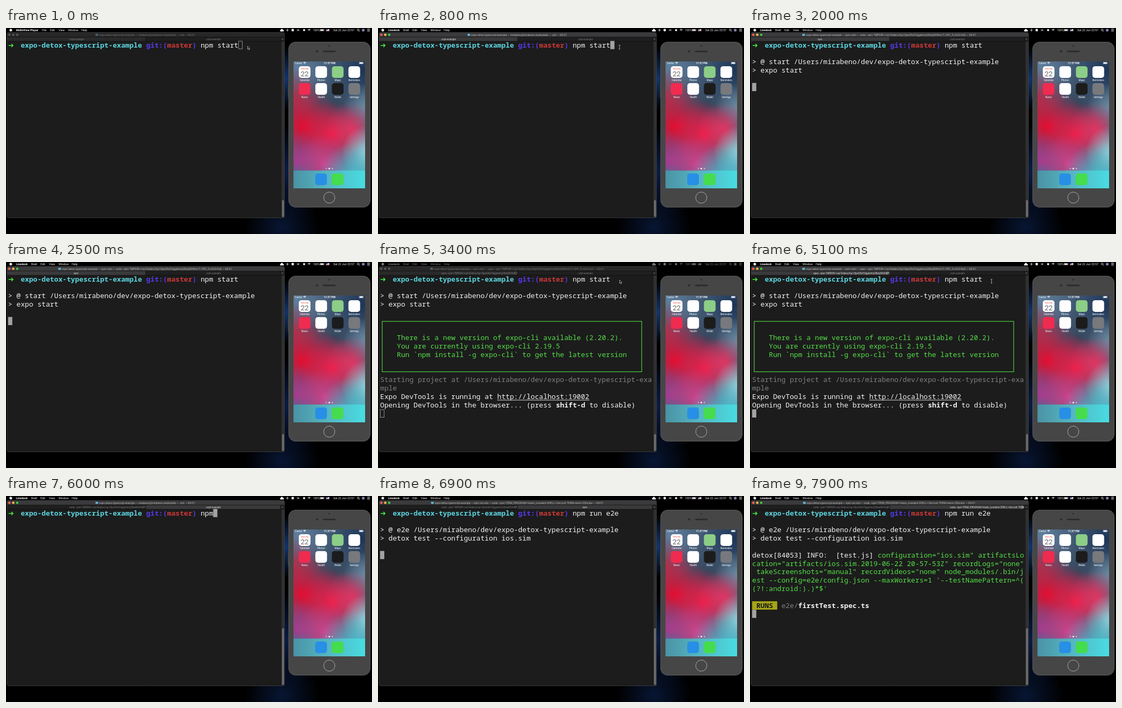
Animation of 690 by 388 pixels, one loop 8 s. Source, as an HTML page with a canvas:

```html
<!DOCTYPE html>
<html lang="en">
<head>
<meta charset="utf-8">
<style>
html, body { margin: 0; width: 100%; height: 100%; overflow: hidden; background: #000; }
canvas { display: block; }
</style>
</head>
<body>
<canvas id="stage" width="690" height="388"></canvas>
<script>
const g = document.getElementById('stage').getContext('2d');
const LOOP = 8000, PITCH = 7.89, ROW = 15.82, LEFT = 4;
const MONO = '"Noto Sans Mono", "DejaVu Sans", monospace';
const UI = 'Roboto, Inter, sans-serif';
const GREEN = '#55df48', WHITE = '#f4f4f4';
const USER = 'mirabeno', PROJECT = 'expo-detox-typescript-example';
const TMP = 'npm TMPDIR=/var/folders/hp/c5pnl2hd10gglxttmj30bty800hr6/T/';
const TERM = 'npm TERM_PROGRAM=Vasko_Linedeck SHELL=/bin/zsh TERM=xterm-256color';

// Key moments in ms
const T = { focus: 500, enter: 1400, notice: 2700, project: 3000, away: 3200, back: 4300,
            tab: 5500, type: 5800, run: 6600, log: 7400, spec: 7700 };

function rect(x, y, w, h, fill, r = 0) {
  g.fillStyle = fill;
  g.beginPath();
  g.roundRect(x, y, w, h, r);
  g.fill();
}

function dot(x, y, r, fill) {
  g.fillStyle = fill;
  g.beginPath();
  g.arc(x, y, r, 0, 7);
  g.fill();
}

function ring(x, y, r, color, width = 0.8, from = 0, to = 7) {
  g.strokeStyle = color;
  g.lineWidth = width;
  g.beginPath();
  g.arc(x, y, r, from, to);
  g.stroke();
}

function line(color, width, ...points) {
  g.strokeStyle = color;
  g.lineWidth = width;
  g.beginPath();
  for (let i = 0; i < points.length; i += 2) g.lineTo(points[i], points[i + 1]);
  g.stroke();
}

function label(text, x, y, size, color, align = 'left', weight = 400) {
  g.font = `${weight} ${size}px ${UI}`;
  g.textAlign = align;
  g.fillStyle = color;
  g.fillText(text, x, y);
  return g.measureText(text).width;
}

function glow(x, y, r, color) {
  const grad = g.createRadialGradient(x, y, 0, x, y, r);
  grad.addColorStop(0, color);
  grad.addColorStop(1, color.slice(0, 7) + '00');
  g.fillStyle = grad;
  g.fillRect(x - r, y - r, 2 * r, 2 * r);
}

// Console text; several [text, color, weight] runs share one row
const colX = col => LEFT + col * PITCH;
const rowY = row => 32 + row * ROW;

function print(row, col, ...runs) {
  g.textAlign = 'left';
  for (const [text, color = WHITE, weight = 400] of runs) {
    g.font = `${weight} 13.15px ${MONO}`;
    g.fillStyle = color;
    g.fillText(text, colX(col), rowY(row) + 4.6);
    col += text.length;
  }
}

function cursor(row, col, active) {
  const x = colX(col), y = rowY(row) - 7.6;
  if (active) rect(x, y, PITCH, 15.4, '#a2a2a2');
  else {
    g.strokeStyle = '#9a9a9a';
    g.lineWidth = 0.9;
    g.strokeRect(x + 0.4, y + 0.5, PITCH - 0.8, 14.4);
  }
}

function wifi(x, y, color) {
  for (const r of [1.2, 2.5, 3.8]) ring(x, y, r, color, 0.8, -2.36, -0.78);
}

function battery(x, y, w, color) {
  g.strokeStyle = color;
  g.lineWidth = 0.5;
  g.strokeRect(x, y, w, 3.6);
  rect(x + 0.7, y + 0.7, w - 1.4, 2.2, color);
  rect(x + w + 0.4, y + 1.1, 0.7, 1.4, color);
}

function menuBar(media, away) {
  const c = away ? '#777' : '#f2f2f2';
  rect(0, 0, 690, 8, '#000');
  dot(9, 4, 2.5, c);
  label(media ? 'MelloView Player' : 'Linedeck', 19, 5.9, 5.4, c, 'left', 700);
  const items = media
    ? { File: 68, Edit: 83, View: 99, Window: 117, Help: 142 }
    : { Shell: 47, Edit: 65, View: 81, Window: 99, Help: 124 };
  for (const name in items) label(name, items[name], 5.9, 5.4, c);

  rect(516.5, 3.5, 7.5, 3, c, 1.5);
  dot(520, 3.4, 2, c);
  line(c, 0.8, 528, 4, 533, 4);
  line(c, 0.8, 530.5, 1.5, 530.5, 6.5);
  dot(540.5, 4, 2.4, c);
  line(c, 0.8, 548.5, 2.5, 553, 5.5);
  line(c, 0.8, 548.5, 5.5, 553, 2.5);
  dot(562, 4, 2, c);
  wifi(571.5, 6, c);
  label('100%', 579, 5.9, 5, c);
  battery(592, 2.2, 7, c);
  rect(603.5, 2, 6, 4, away ? '#555' : '#d9d9e2');
  rect(603.5, 2, 3, 2, away ? '#333' : '#3b4a9c');
  line(away ? '#666' : '#c33b48', 0.7, 603.5, 5, 609.5, 5);
  label('Sat 22 Jun 23:57', 617, 5.9, 5.3, c);
  ring(664, 3.6, 1.7, c);
  line(c, 0.8, 665.2, 4.9, 667, 6.7);
  dot(673.5, 4, 2.6, away ? '#555' : '#8a7fb5');
  for (const y of [2, 4, 6]) line(c, 0.8, 681, y, 686, y);
}

function windowState(t) {
  if (t < T.enter) return [`${USER}@${USER}-studiodesk — -zsh`, '..cript-example', '..cript-example'];
  if (t < T.project) return [`npm start — node ‹ ${TMP} XPC_FLAGS=0x0`, 'npm', '..cript-example'];
  if (t < T.tab) return [`npm start — open ‹ ${TMP} XPC_FLAGS=0x0`, `open ‹ ${TMP}…`, '..cript-example'];
  const first = `node ‹ ${TMP}…`;
  if (t < T.run) return [`${USER}@${USER}-studiodesk — -zsh`, first, '..cript-example'];
  return [`npm run e2e — node ‹ ${TERM}`, first, t < T.log ? 'npm' : `node ‹ ${TERM.slice(0, 52)}…`];
}

function windowChrome(t, active) {
  const second = t >= T.tab;
  const [detail, ...tabs] = windowState(t);
  rect(2, 8.5, 523, 349, '#1c1c1c', 3);
  rect(2, 8.5, 523, 8.5, active ? '#3a3a3c' : '#272728', [3, 3, 0, 0]);
  const lights = active ? ['#fb5f57', '#fdbc40', '#34c84a'] : ['#555', '#555', '#555'];
  lights.forEach((c, i) => dot(6.3 + i * 7.4, 12.7, 2.3, c));

  const width = label(`${PROJECT} — ${detail} — 65×21`, 266, 14.6, 4.95, active ? '#b8b8b8' : '#727272', 'center');
  rect(266 - width / 2 - 7, 11, 5, 3.8, active ? '#62b5da' : '#4a6470', 0.6);

  rect(2, 17, 523, 8, '#202021');
  tabs.forEach((name, i) => {
    const on = (i === 1) === second;
    const x = i ? 263.5 : 2, w = i ? 253.5 : 261;
    rect(x, 17, w, 8, on ? (active ? '#3a3a3c' : '#2a2a2b') : '#1f1f20');
    const color = on && active ? '#dedede' : '#777';
    g.save();
    g.beginPath();
    g.rect(x, 17, w, 8);
    g.clip();
    const long = name.length > 20;
    label(name, i ? (long ? 450 : 390) : (long ? 194 : 132), 22.7, 4.5, color, 'center');
    g.restore();
    if (long) ring(i ? 512.5 : 259, 21, 2, color, 0.7, t / 130, t / 130 + 4.8);
  });
  line('#0d0d0d', 0.7, 2, 17, 525, 17);
  line('#0d0d0d', 0.7, 2, 25, 525, 25);
  line('#111', 0.7, 263.3, 17, 263.3, 25);
  line('#111', 0.7, 517.3, 17, 517.3, 25);
  line('#888', 0.6, 519.5, 21, 522.5, 21);
  line('#888', 0.6, 521, 19.5, 521, 22.5);

  rect(519.5, 25.4, 5.5, 331, '#303031');
  const top = second ? 249 : 324;
  rect(520.2, top, 4, 356 - top, '#6b6b6b', 2);
  g.strokeStyle = '#505052';
  g.lineWidth = 0.6;
  g.beginPath();
  g.roundRect(2, 8.5, 523, 349, 3);
  g.stroke();
}

function prompt(command) {
  print(0, 0, ['➜  ', '#43e83a', 700], [PROJECT, '#5bd5df', 700], [' '],
    ['git:(', '#5838ef', 700], ['master', '#cd3838', 700], [') ', '#5838ef', 700], [command, WHITE, 500]);
}

function startTab(t, active) {
  prompt('npm start');
  if (t < T.enter) return cursor(0, 55, active);
  print(2, 0, [`> @ start /Users/${USER}/dev/${PROJECT}`]);
  print(3, 0, ['> expo start']);
  if (t < T.notice) return cursor(5, 0, active);

  g.strokeStyle = GREEN;
  g.lineWidth = 1.1;
  g.strokeRect(colX(0.5), rowY(5) + 0.7, 62 * PITCH, 6 * ROW);
  ['There is a new version of expo-cli available (2.20.2).',
   'You are currently using expo-cli 2.19.5',
   'Run `npm install -g expo-cli` to get the latest version'
  ].forEach((text, i) => print(7 + i, 4, [text, GREEN]));
  if (t < T.project) return cursor(12, 0, active);

  const path = `Starting project at /Users/${USER}/dev/${PROJECT}`;
  print(12, 0, [path.slice(0, 65), '#808080']);
  print(13, 0, [path.slice(65), '#808080']);
  print(14, 0, ['Expo DevTools is running at http://localhost:19002']);
  line(WHITE, 0.9, colX(28), rowY(14) + 6.6, colX(50), rowY(14) + 6.6);
  print(15, 0, ['Opening DevTools in the browser... (press '], ['shift-d', WHITE, 700], [' to disable)']);
  cursor(16, 0, active);
}

function testTab(t) {
  const command = 'npm run e2e';
  const typed = Math.max(0, Math.min(command.length, Math.floor((t - T.type) / 60)));
  prompt(command.slice(0, typed));
  if (t < T.run) return cursor(0, 46 + typed, true);
  print(2, 0, [`> @ e2e /Users/${USER}/dev/${PROJECT}`]);
  print(3, 0, ['> detox test --configuration ios.sim']);
  if (t < T.log) return cursor(5, 0, true);

  print(5, 0, ['detox[84053] INFO:  [test.js] '], ['configuration="ios.sim" artifactsLo', GREEN]);
  ['cation="artifacts/ios.sim.2019-06-22 20-57-53Z" recordLogs="none"',
   ' takeScreenshots="manual" recordVideos="none" node_modules/.bin/j',
   "est --config=e2e/config.json --maxWorkers=1 '--testNamePattern=^(",
   "(?!:android:).)*$'"
  ].forEach((text, i) => print(6 + i, 0, [text, GREEN]));
  if (t < T.spec) return cursor(10, 0, true);

  rect(LEFT, rowY(11) - 7.8, 6 * PITCH, 15.8, '#a5a516');
  print(11, 0, [' RUNS ', '#191919', 700], [' '], ['e2e/', '#808080'], ['firstTest.spec.ts', WHITE, 700]);
  cursor(12, 0, true);
}

function pointer(t, active) {
  if (!active) {
    g.beginPath();
    [[455.5, 34], [455.5, 40], [456.9, 38.8], [457.9, 41], [458.8, 40.6], [457.9, 38.5], [459.8, 38.4]]
      .forEach(p => g.lineTo(...p));
    g.closePath();
    g.fillStyle = '#000';
    g.fill();
    g.strokeStyle = '#ddd';
    g.lineWidth = 0.7;
    g.stroke();
  } else if (t < T.enter || (t >= T.back && t < T.tab)) {
    line('#ccc', 0.8, 455.3, 33, 455.3, 39.5);
    line('#ccc', 0.8, 453.8, 32.6, 456.8, 32.6);
    line('#ccc', 0.8, 453.8, 39.8, 456.8, 39.8);
  }
}

function wallpaper() {
  rect(542, 63, 135, 239, '#465e78');
  glow(550, 75, 60, '#5f7f9dff');
  glow(672, 80, 70, '#1d3557ff');
  glow(620, 145, 60, '#34465cff');
  glow(680, 150, 45, '#6d8ea5ff');
  glow(540, 130, 55, '#a33a55ff');
  glow(560, 185, 75, '#e30d31ff');
  glow(615, 200, 62, '#ee1c48ff');
  glow(652, 190, 50, '#e93563e0');
  glow(548, 250, 55, '#a33d8fff');
  glow(600, 255, 55, '#d0408aff');
  glow(684, 235, 52, '#a9dde6ff');
  glow(660, 290, 75, '#4fcbdaff');
  glow(550, 300, 45, '#526fa0ff');
  const dock = g.createLinearGradient(542, 0, 677, 0);
  dock.addColorStop(0, '#4a93a5');
  dock.addColorStop(0.45, '#55b4c0');
  dock.addColorStop(1, '#48dce2');
  g.fillStyle = dock;
  g.fillRect(542, 268.5, 135, 34);
}

function phone() {
  rect(531.3, 106, 3, 25, '#333', 1);
  rect(532.5, 26, 154.5, 312, '#626262', 14);
  rect(533.3, 26.8, 152.9, 310.4, '#464646', 13.4);
  dot(609.5, 33.5, 1.5, '#2a2a2a');
  dot(586.5, 44, 2.1, '#2a2a2a');
  rect(597.5, 42.8, 24, 2.6, '#2a2a2a', 1.3);
  ring(609.5, 319.5, 10.5, '#b5b5b5', 0.9);

  g.save();
  g.beginPath();
  g.rect(542, 63, 135, 239);
  g.clip();
  wallpaper();
  g.restore();

  label('Carrier', 544.5, 67.6, 4.6, '#fff');
  wifi(563, 68, '#fff');
  label('11:57 PM', 610, 67.8, 5, '#fff', 'center', 700);
  battery(666, 64.2, 7, '#fff');

  const apps = [['Calendar', '#fff'], ['Photos', '#fff'], ['Maps', '#8cce87'], ['Reminders', '#fff'],
                ['News', '#ef2b50'], ['Health', '#fff'], ['Wallet', '#1c1c1c'], ['Settings', '#77797d']];
  apps.forEach(([name, color], i) => {
    const x = 563 + (i % 4) * 31.2, y = 83 + (i >> 2) * 31.7;
    rect(x - 11, y - 11, 22, 22, color, 5);
    label(name, x, y + 16.8, 4.7, '#fff', 'center');
  });
  label('Saturday', 563, 77.6, 3.7, '#e8453c', 'center');
  label('22', 563, 90.6, 13.5, '#222', 'center', 300);

  ring(604, 264.6, 0.9, '#ffffffb0', 0.7);
  dot(609.5, 264.8, 1.5, '#fff');
  dot(615.3, 264.8, 1.3, '#ffffff90');
  rect(583, 274, 22, 22, '#278fe6', 5);
  rect(614.2, 274, 22, 22, '#45dc4d', 5);
}

function desktop() {
  rect(0, 0, 690, 388, '#000');
  glow(528, 95, 60, '#12356cff');
  glow(528, 270, 90, '#0a1c45ff');
  glow(520, 375, 70, '#081633ff');
}

function draw(t) {
  const media = t < T.focus;
  const away = t >= T.away && t < T.back;
  const active = !media && !away;
  desktop();
  menuBar(media, away);
  windowChrome(t, active);
  if (t < T.tab) startTab(t, active);
  else testTab(t);
  pointer(t, active);
  phone();
}

const begin = performance.now();
function tick() {
  draw((performance.now() - begin) % LOOP);
  requestAnimationFrame(tick);
}
tick();
</script>
</body>
</html>
```
